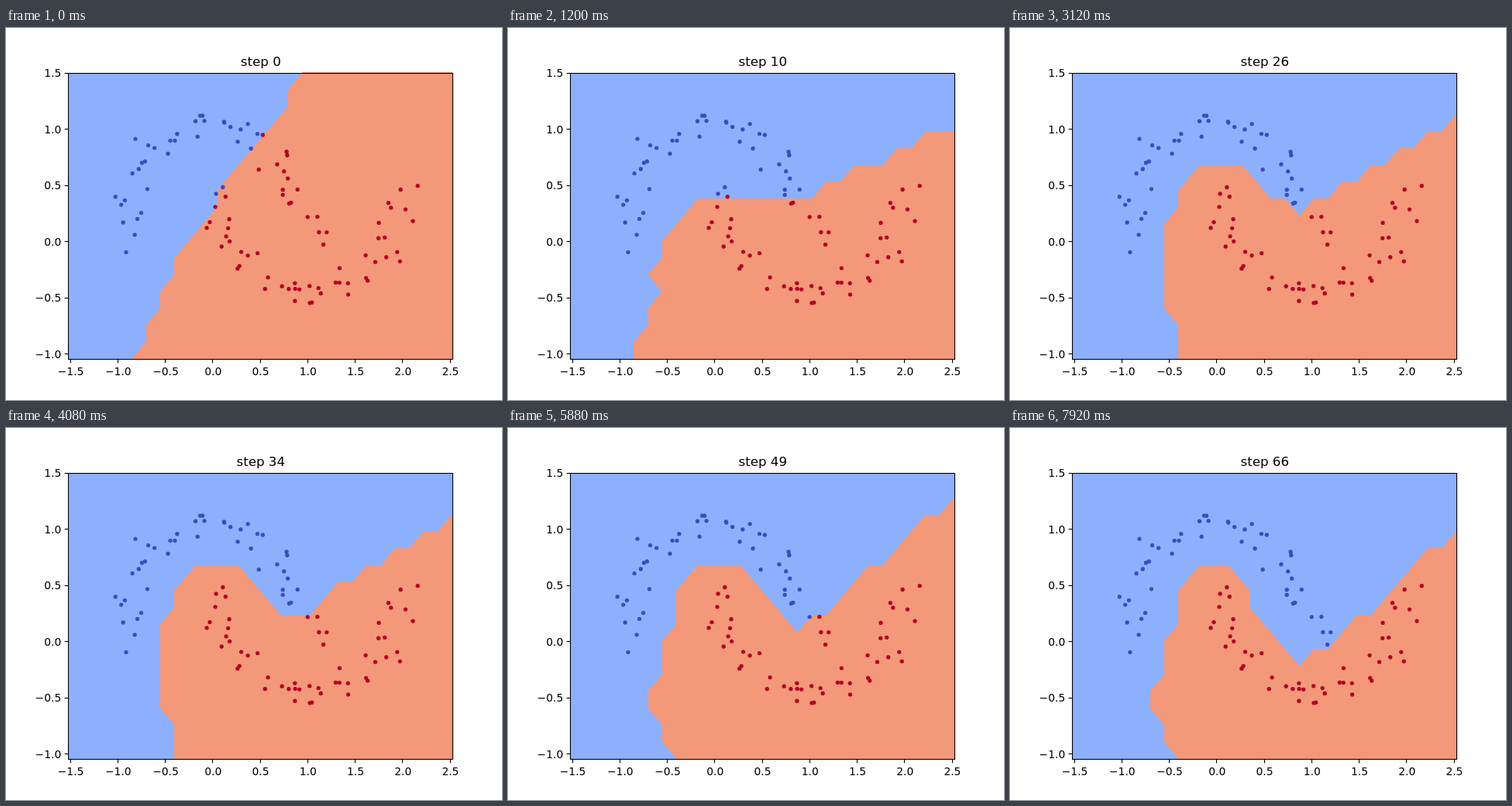
An HTML page for the animation above (8 s loop, 640x480 px).

```html
<!DOCTYPE html>
<html lang="en">
<head>
<meta charset="utf-8">
<title>Decision boundary</title>
<style>
  html, body { margin: 0; width: 100%; height: 100%; overflow: hidden; background: #fff; }
  svg { display: block; width: 640px; height: 480px; }
  text { font: 13.89px "DejaVu Sans", sans-serif; }
  #title { font-size: 16.67px; text-anchor: middle; }
</style>
</head>
<body>
<svg viewBox="0 0 640 480">
  <rect x="80" y="58" width="496" height="369" fill="#8db0fe"/>
  <path id="region" fill="#f4987a" shape-rendering="crispEdges"/>
  <g id="dots"></g>
  <g id="axes" stroke="#000" stroke-width="1.1" fill="none">
    <rect x="80.5" y="58.5" width="496" height="369"/>
  </g>
  <g id="labels"></g>
  <text id="title" x="328.8" y="49"></text>
</svg>
<script>
const STEP_MS = 120, LOOP_MS = 8000;
const LEFT = 80, TOP = 57.6, COLS = 27, ROWS = 17;
const CELL_W = 496 / COLS, CELL_H = 369.6 / ROWS;
const EDGE_SHIFT = -0.45; // makes hard edges round down to whole pixels

// Key points of the boundary, as [grid column, grid row]:
// foot, lower side, upper side, left shoulder, right shoulder, valley, rise, far end.
const POSES = [
  { step: 0, edge: [[4.35, 17.5], [5.6, 15], [7.2, 12], [8.7, 10], [11.7, 6], [13.4, 4], [15, 2], [17.4, -1]] },
  { step: 10, edge: [[4.2, 17.5], [6.2, 13], [5.6, 12], [8.9, 7.2], [13, 7.2], [15.5, 7.4], [17, 7.2], [27.5, 2.85]] },
  { step: 34, edge: [[7.8, 17.5], [7.1, 14.8], [6.2, 10.2], [8.6, 5.2], [12, 5.7], [16, 8.8], [18, 7.25], [27.5, 2.45]] },
  { step: 49, edge: [[7.5, 17.5], [5.6, 13.6], [6.45, 10.8], [8.6, 5.2], [12, 5.7], [16, 9.2], [18, 8.05], [27.5, 0.9]] },
  { step: 66, edge: [[7.5, 17.5], [5.6, 13.6], [6.45, 10.8], [8.6, 5.2], [11.2, 5.9], [16, 11.7], [18, 10.27], [27.5, 3.1]] }
];

const byId = id => document.getElementById(id);
const toX = value => 266.45 + 122.47 * value;
const toY = value => 275.3 - 144.94 * value;
const mix = (a, b, u) => a + (b - a) * u;
const easeOut = u => 1 - (1 - u) ** 2;

function add(parent, tag, attributes, text = "") {
  const node = document.createElementNS("http://www.w3.org/2000/svg", tag);
  for (const name in attributes) node.setAttribute(name, attributes[name]);
  node.textContent = text;
  return byId(parent).appendChild(node);
}

// MT19937
function* mersenneTwister(seed) {
  const size = 624, state = new Uint32Array(size);
  state[0] = seed;
  for (let i = 1; i < size; i++) {
    state[i] = Math.imul(1812433253, state[i - 1] ^ (state[i - 1] >>> 30)) + i;
  }
  for (let i = 0; ; i = (i + 1) % size) {
    const bits = (state[i] & 0x80000000) | (state[(i + 1) % size] & 0x7fffffff);
    state[i] = state[(i + 397) % size] ^ (bits >>> 1) ^ (bits & 1 ? 0x9908b0df : 0);
    let y = state[i];
    y ^= y >>> 11;
    y ^= (y << 7) & 0x9d2c5680;
    y ^= (y << 15) & 0xefc60000;
    yield (y ^ (y >>> 18)) >>> 0;
  }
}

// Two interleaving half circles, shuffled, with Gaussian noise.
function makeMoons(count, noise, seed) {
  const source = mersenneTwister(seed);
  const next = () => source.next().value;
  const uniform = () => ((next() >>> 5) * 2 ** 26 + (next() >>> 6)) / 2 ** 53;

  const angles = Array.from({ length: count / 2 }, (_, i) => Math.PI * i / (count / 2 - 1));
  const points = [
    ...angles.map(a => [Math.cos(a), Math.sin(a)]),
    ...angles.map(a => [1 - Math.cos(a), 0.5 - Math.sin(a)])
  ];
  for (let i = count - 1; i > 0; i--) {
    const mask = 2 ** (32 - Math.clz32(i)) - 1;
    let j;
    do j = next() & mask; while (j > i);
    [points[i], points[j]] = [points[j], points[i]];
  }
  return points.map(([x, y]) => {
    let a, b, r;
    do {
      a = 2 * uniform() - 1;
      b = 2 * uniform() - 1;
      r = a * a + b * b;
    } while (r >= 1 || r === 0);
    const scale = noise * Math.sqrt(-2 * Math.log(r) / r);
    return [x + scale * b, y + scale * a];
  });
}

function redPolygon(step) {
  const next = Math.max(1, POSES.findIndex(pose => pose.step >= step));
  const from = POSES[next - 1], to = POSES[next];
  const u = easeOut((step - from.step) / (to.step - from.step));
  const edge = from.edge.map(([x, y], n) => [mix(x, to.edge[n][0], u), mix(y, to.edge[n][1], u)]);
  return [...edge, [COLS + 1, -1], [COLS + 1, ROWS + 1], [edge[0][0], ROWS + 1]];
}

function contains(polygon, x, y) {
  let inside = false;
  polygon.forEach(([x1, y1], n) => {
    const [x2, y2] = polygon[(n + 1) % polygon.length];
    if ((y1 > y) !== (y2 > y) && x > mix(x1, x2, (y - y1) / (y2 - y1))) inside = !inside;
  });
  return inside;
}

// Contour of the classified grid, cut halfway between differing neighbours.
function regionPath(isRed) {
  const grid = Array.from({ length: ROWS + 1 }, (_, row) =>
    Array.from({ length: COLS + 1 }, (_, col) => isRed(col, row)));
  const place = ([col, row]) =>
    (LEFT + EDGE_SHIFT + col * CELL_W).toFixed(2) + " " + (TOP + EDGE_SHIFT + row * CELL_H).toFixed(2);
  let path = "";
  for (let row = 0; row < ROWS; row++) {
    for (let col = 0; col < COLS; col++) {
      const corners = [[col, row], [col + 1, row], [col + 1, row + 1], [col, row + 1]];
      const outline = [];
      corners.forEach(([x, y], n) => {
        const [nx, ny] = corners[(n + 1) % 4];
        if (grid[y][x]) outline.push([x, y]);
        if (grid[y][x] !== grid[ny][nx]) outline.push([(x + nx) / 2, (y + ny) / 2]);
      });
      if (outline.length) path += "M" + outline.map(place).join("L") + "Z";
    }
  }
  return path;
}

function drawAxes() {
  const snap = v => Math.floor(v + 0.5) + 0.5;
  const label = v => v.toFixed(1).replace("-", "\u2212");
  for (let v = -1.5; v <= 2.5; v += 0.5) {
    add("axes", "path", { d: `M${snap(toX(v))} 427.5v4.9` });
    add("labels", "text", { x: toX(v) + 0.8, y: 448, "text-anchor": "middle" }, label(v));
  }
  for (let v = -1; v <= 1.5; v += 0.5) {
    add("axes", "path", { d: `M80.5 ${snap(toY(v))}h-4.9` });
    add("labels", "text", { x: 71.3, y: Math.round(toY(v) + 5.3), "text-anchor": "end" }, label(v));
  }
}

const dots = makeMoons(100, 0.1, 1337).map(([x, y]) => {
  const cx = toX(x), cy = toY(y);
  return {
    col: (cx - LEFT) / CELL_W,
    row: (cy - TOP) / CELL_H,
    node: add("dots", "circle", { cx, cy, r: 2.65 })
  };
});

let shownStep = -1;
function draw() {
  const step = Math.floor(performance.now() % LOOP_MS / STEP_MS);
  if (step !== shownStep) {
    shownStep = step;
    const polygon = redPolygon(step);
    const isRed = (col, row) => contains(polygon, col, row);
    byId("title").textContent = "step " + step;
    byId("region").setAttribute("d", regionPath(isRed));
    for (const { col, row, node } of dots) {
      node.setAttribute("fill", isRed(col, row) ? "#b40426" : "#3b4cc0");
    }
  }
  requestAnimationFrame(draw);
}

drawAxes();
draw();
</script>
</body>
</html>
```
